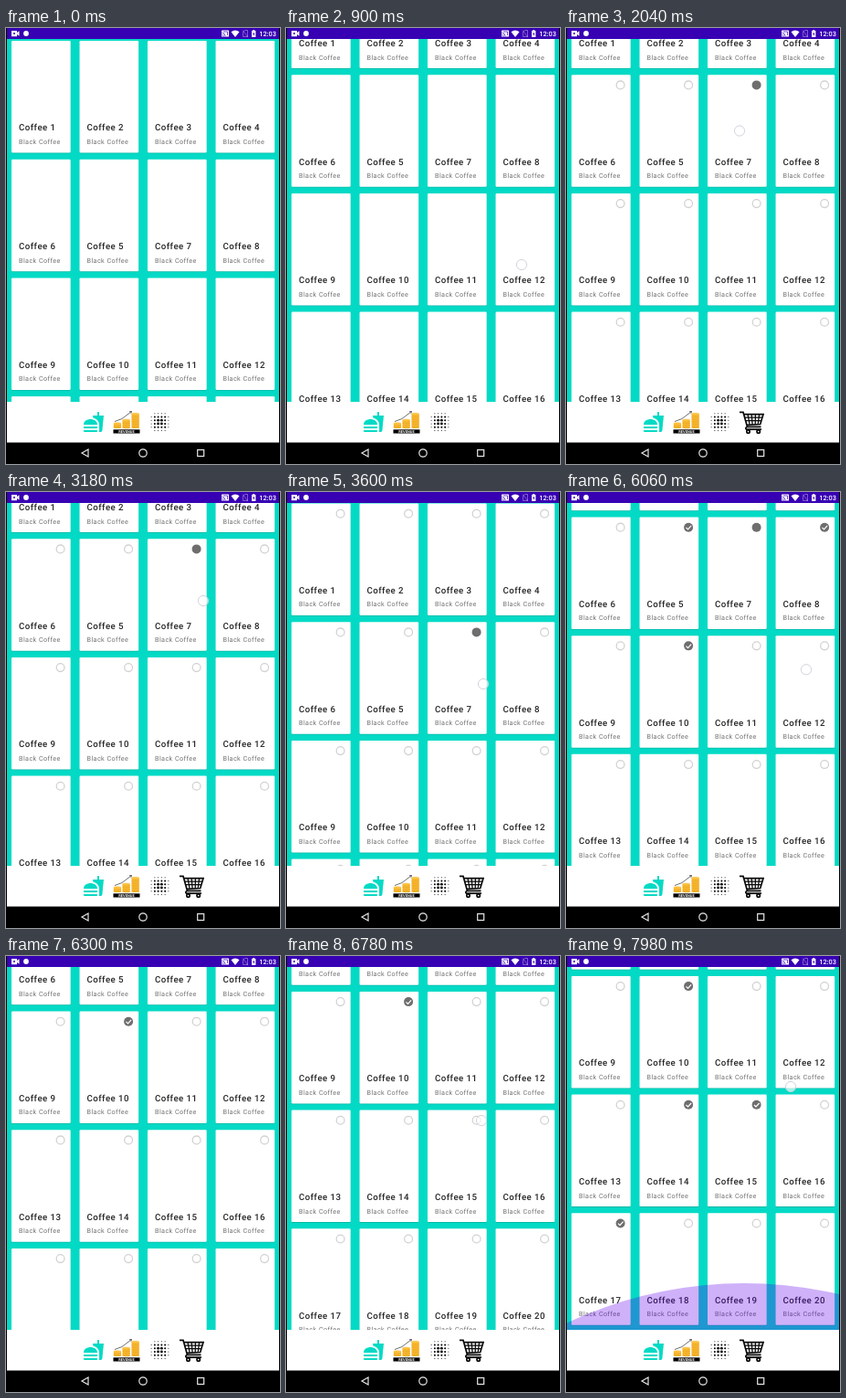
An HTML page that plays this animation: 300x477 px, repeating every 8000 ms.

```html
<!DOCTYPE html>
<html lang="en">
<head>
<meta charset="utf-8">
<title>Coffee list</title>
<style>
  html, body { margin: 0; width: 100%; height: 100%; overflow: hidden; background: #000; }
  svg { display: block; width: 100%; height: 100%; font-family: Roboto, sans-serif; text-rendering: geometricPrecision; }
  .title { font-size: 9.7px; font-weight: 500; letter-spacing: .45px; fill: #262626; }
  .sub { font-size: 7.2px; letter-spacing: .43px; fill: #707070; }
</style>
</head>
<body>
<svg viewBox="0 0 300 477">
  <defs>
    <clipPath id="view"><rect x="1" y="12" width="298" height="397"/></clipPath>
  </defs>
  <rect width="300" height="477"/>

  <g clip-path="url(#view)">
    <rect x="1" y="12" width="298" height="397" fill="#03dac5"/>
    <g id="list"></g>
    <g fill="#6200ee" opacity=".3">
      <circle id="glowTop" cx="195" cy="403" r="454"/>
      <circle id="glowBottom" cx="195" cy="403" r="454"/>
    </g>
  </g>

  <!-- status bar -->
  <rect x="1" width="298" height="12" fill="#3700b3"/>
  <g fill="#fff">
    <path d="M6 3h6v2l2.500-1.800v5.600l-2.500-1.800v2.200h-6z"/>
    <circle cx="9" cy="6" r="1" fill="#3700b3"/>
    <circle cx="22" cy="6" r="2.900"/>
    <rect x="236" y="2.500" width="8" height="7" rx=".6"/>
    <path d="M236.500 5.500a3.500 3.500 0 0 1 3.500 3.500M236.500 7.500a1.500 1.500 0 0 1 1.500 1.500M238 4h4.500v4" fill="none" stroke="#3700b3" stroke-width=".7"/>
    <path d="M246.500 4.300q4.500-3.400 9 0l-4.500 5.700z"/>
    <path d="M259.500 9.500v-5l2-2h3v7zM259 2.500l6 7.500" fill="none" stroke="#fff" stroke-width=".8" opacity=".45"/>
    <path d="M269 3h1.200v-1h2v1h1.200v7h-4.400z"/>
    <path d="M271.600 4l-1.500 3h1l-.3 2 1.600-3h-1z" fill="#3700b3"/>
    <text x="277.300" y="8.700" font-size="7.300" font-weight="500">12:03</text>
  </g>

  <!-- app bar -->
  <rect x="1" y="409" width="298" height="44.500" fill="#fff"/>
  <path transform="translate(84 419)" fill="#03dac5" d="M18.060 23h1.660c.84 0 1.530-.64 1.630-1.460L23 5.050h-5V1h-1.970v4.050h-4.970l.3 2.340c1.710.47 3.310 1.320 4.270 2.260 1.440 1.420 2.430 2.890 2.430 5.290zM1 22V21h15v1q0 1-1 1H2q-1 0-1-1zM16 15c0-8-15-8-15 0zM1 17h15v2h-15z"/>
  <g id="chart">
    <path d="M119 430.500l8-3 10.500-8M135 419.600l2.500-.1-.6 2.300" fill="none" stroke="#333" stroke-width=".7"/>
    <rect x="117.500" y="439.300" width="29" height="4.200"/>
    <text x="132" y="442.900" font-size="4" font-weight="700" fill="#fff" text-anchor="middle">REVENUE</text>
  </g>
  <g id="dots"></g>
  <g id="cart" fill="none" stroke="#0a0a0a" stroke-width="1.700">
    <path d="M190 420.300h4l4.500 16h15M194.500 422.700h21.500l-3.300 10.800-15 .8M214 439.200h-16.500q-1.800-1.600.8-3"/>
    <path d="M195.500 426.200h19M196.500 429.700h17M199 422.700l2 11M203.200 422.700l.9 11M207.400 422.700l-.2 11M211.600 422.700l-1.400 11" stroke-width="1.300"/>
    <circle cx="199.500" cy="441.500" r="1.700"/>
    <circle cx="210.700" cy="441.500" r="1.700"/>
  </g>

  <!-- system navigation -->
  <g fill="none" stroke="#e8e8e8" stroke-width="1.200">
    <path d="M90 461v8l-7-4z"/>
    <circle cx="150" cy="465" r="4.200"/>
    <rect x="209.700" y="461.500" width="7" height="7"/>
  </g>

  <circle id="touch" r="5.600" fill="#fff" fill-opacity=".65" stroke="#cdcdd8" stroke-width=".9"/>
</svg>

<script>
const LOOP = 8000;
const SELECT_AT = 2040;
const PITCH_X = 74.5, PITCH_Y = 129.7;

// Time at which each coffee gets its tick; number 7 stays a plain dot.
const checkedAt = { 8: 4140, 5: 4620, 10: 5760, 15: 6900, 14: 7080, 17: 7500 };

// start, end, from, to
const scrolls = [
  [540, 900, 0, 92.5],
  [3200, 3660, 92.5, 0],
  [5890, 6480, 0, 234.5],
  [7660, 7820, 234.5, 251.5]
];

// start, end, x, y within the scrolled content
const touches = [
  [540, 1080, 258, 351.5],
  [1560, 2400, 190, 205],
  [3180, 3900, 216, 211.5],
  [4020, 4260, 283, 154],
  [4560, 4720, 131, 154],
  [5700, 5820, 134, 285],
  [5880, 6200, 263, 310.5],
  [6780, 6960, 214, 414.5],
  [7020, 7170, 136, 414.5],
  [7440, 7560, 60, 544],
  [7640, 8000, 246, 444.5]
];

const $ = id => document.getElementById(id);

function add(parent, tag, attrs, text) {
  const node = document.createElementNS('http://www.w3.org/2000/svg', tag);
  for (const key in attrs) node.setAttribute(key, attrs[key]);
  if (text) node.textContent = text;
  return parent.appendChild(node);
}

const show = (node, on) => node.setAttribute('visibility', on ? 'visible' : 'hidden');
const progress = (t, a, b) => Math.min(1, Math.max(0, (t - a) / (b - a)));
const easeOut = p => 1 - (1 - p) ** 2;

function buildCard(i) {
  const number = i === 4 ? 6 : i === 5 ? 5 : i + 1;
  const x = 6 + (i % 4) * PITCH_X;
  const y = 14 + Math.floor(i / 4) * PITCH_Y;
  const card = add($('list'), 'g', { transform: `translate(${x} ${y})` });
  add(card, 'rect', { y: .8, width: 64.7, height: 122.5, rx: 1.5, opacity: .16 });
  add(card, 'rect', { width: 64.7, height: 122.5, rx: 1.2, fill: '#fff' });
  add(card, 'text', { x: 8, y: 98.4, class: 'title' }, 'Coffee ' + number);
  add(card, 'text', { x: 8, y: 113, class: 'sub' }, 'Black Coffee');
  const mark = { cx: 53.6, cy: 11.2 };
  const ring = add(card, 'circle', { ...mark, r: 4.4, fill: 'none', stroke: '#d2d2d2', 'stroke-width': 1.3 });
  const disc = add(card, 'circle', { ...mark, r: 5, fill: '#6e6e6e' });
  const tick = add(card, 'path', { d: 'M51 11.400l2 2 3.600-4', fill: 'none', stroke: '#fff', 'stroke-width': 1.2 });
  return { number, ring, disc, tick };
}

function buildCoins() {
  [[117.8, 433], [127.5, 429.3], [137.5, 422.5]].forEach(([x, y]) => {
    add($('chart'), 'rect', { x, y, width: 8.3, height: 438 - y, rx: 1, fill: '#f6b52c' });
    for (let line = y + 3; line < 438; line += 2.6)
      add($('chart'), 'path', { d: `M${x} ${line}q4.150 1 8.300 0`, fill: 'none', stroke: '#e8a422', 'stroke-width': .5 });
    add($('chart'), 'ellipse', { cx: x + 4.15, cy: y, rx: 4.15, ry: 1.3, fill: '#ffc640', stroke: '#e8a422', 'stroke-width': .4 });
  });
}

function buildDots() {
  for (let i = 0; i < 36; i++) {
    const dx = i % 6 - 2.5, dy = Math.floor(i / 6) - 2.5;
    const d = Math.hypot(dx, dy);
    if (d < 3.4)
      add($('dots'), 'circle', { cx: 168.5 + dx * 3.75, cy: 431 + dy * 3.75, r: d < 1 ? 1.45 : d < 2.2 ? 1 : .5 });
  }
}

function scrollAt(t) {
  let pos = 0;
  for (const [a, b, from, to] of scrolls)
    if (t >= a) pos = from + (to - from) * easeOut(progress(t, a, b));
  return pos;
}

function render(t) {
  const scroll = scrollAt(t);
  const top = .4 * progress(t, 3620, 3800) * (1 - progress(t, 3840, 3960));
  const bottom = easeOut(progress(t, 7760, 7980));

  $('list').setAttribute('transform', `translate(0 ${-scroll})`);
  $('glowTop').setAttribute('transform', `translate(0 12) scale(1 ${-top})`);
  $('glowBottom').setAttribute('transform', `translate(0 409) scale(1 ${bottom})`);
  show($('glowTop'), top > 0);
  show($('glowBottom'), bottom > 0);

  const selecting = t >= SELECT_AT;
  show($('cart'), selecting);
  for (const { number, ring, disc, tick } of cards) {
    const ticked = t >= checkedAt[number];
    const filled = ticked || (selecting && number === 7);
    show(ring, selecting && !filled);
    show(disc, filled);
    show(tick, ticked);
  }

  const touch = touches.find(([a, b]) => t >= a && t < b);
  show($('touch'), touch);
  if (touch) {
    $('touch').setAttribute('cx', touch[2]);
    $('touch').setAttribute('cy', touch[3] - scroll + 50 * (top - bottom));
  }
}

const cards = Array.from({ length: 20 }, (_, i) => buildCard(i));
buildCoins();
buildDots();

const start = performance.now();
function loop() {
  render((performance.now() - start) % LOOP);
  requestAnimationFrame(loop);
}
loop();
</script>
</body>
</html>
```
